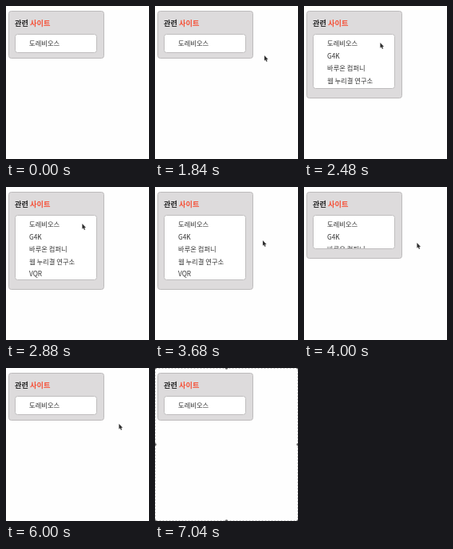
These frames come from a looping animation (179x192 px, 7.84 s). An HTML page with a canvas:

```html
<!DOCTYPE html>
<html lang="ko">
<head>
<meta charset="utf-8">
<title>관련 사이트</title>
<style>
html, body { margin: 0; width: 100%; height: 100%; overflow: hidden; background: #fff; }
canvas { display: block; width: 179px; height: 192px; }
</style>
</head>
<body>
<canvas id="stage"></canvas>
<script>
const W = 179, H = 192, LOOP = 7840, STEP = 80;
const FONT = '"Noto Sans CJK KR", "Noto Sans CJK", "Noto Sans", sans-serif';
const ITEMS = ['도레비오스', 'G4K', '바루온 컴퍼니', '웹 누리결 연구소', 'VQR'];
const CLOSED = 23, OPEN = 81, MAX = 96;
const OPEN_AT = 2120, CLOSE_AT = 3554, FADE = 1000;
const FRAME_AT = 6080;

// time, x, y of the pointer tip
const PATH = [
  [960, 169, 129], [1680, 138, 63], [1840, 136.5, 62], [2080, 122, 57],
  [2480, 95, 46], [3360, 95, 46], [3680, 134.5, 67], [4000, 141, 70]
];

const canvas = document.getElementById('stage');
const ctx = canvas.getContext('2d');
const ratio = window.devicePixelRatio || 1;
canvas.width = W * ratio;
canvas.height = H * ratio;

const clamp = v => Math.max(0, Math.min(1, v));

// cubic-bezier(.25, .1, .25, 1)
function ease(p) {
  p = clamp(p);
  let lo = 0, hi = 1;
  for (let i = 0; i < 24; i++) {
    const s = (lo + hi) / 2, r = 1 - s;
    if (0.75 * r * s * (r + s) + s * s * s < p) lo = s; else hi = s;
  }
  const r = 1 - lo;
  return 0.3 * r * r * lo + 3 * r * lo * lo + lo * lo * lo;
}

function listHeight(t) {
  const k = t < CLOSE_AT ? ease((t - OPEN_AT) / FADE) : 1 - ease((t - CLOSE_AT) / FADE);
  return Math.min(OPEN, CLOSED + (MAX - CLOSED) * k);
}

function pointerAt(t) {
  let i = 0;
  while (i < PATH.length - 2 && t >= PATH[i + 1][0]) i++;
  const [t0, x0, y0] = PATH[i], [t1, x1, y1] = PATH[i + 1];
  const p = clamp((t - t0) / (t1 - t0));
  return [x0 + (x1 - x0) * p, y0 + (y1 - y0) * p];
}

function box(x, y, w, h, fill, stroke) {
  ctx.beginPath();
  ctx.roundRect(x + 0.5, y + 0.5, w - 1, h - 1, 3);
  ctx.fillStyle = fill;
  ctx.fill();
  ctx.lineWidth = 1;
  ctx.strokeStyle = stroke;
  ctx.stroke();
}

function text(str, x, y, size, color, weight = 400) {
  ctx.font = `${weight} ${size}px ${FONT}`;
  ctx.fillStyle = color;
  ctx.fillText(str, x, y);
}

function drawPanel(t) {
  const h = Math.round(listHeight(t));
  const gap = 8 + 5 * clamp((h - CLOSED) / 15);
  box(3, 6, 120, Math.round(29 + h + gap), '#dddbdc', '#bdbbbc');
  text('관련', 11, 24.8, 9.2, '#2a2a2a', 700);
  text('사이트', 30, 24.8, 9.2, '#f5533a', 700);
  box(11, 35, 103, h + 1, '#fff', '#bfbdbe');
  ctx.save();
  ctx.beginPath();
  ctx.rect(12, 36, 101, h - 1);
  ctx.clip();
  ITEMS.forEach((s, i) => text(s, 29, 50.2 + 15.5 * i, 8.3, '#333'));
  ctx.restore();
}

function drawPointer(t) {
  const [x, y] = pointerAt(t);
  ctx.save();
  ctx.translate(x + 0.5, y + 0.3);
  ctx.beginPath();
  [[0, 0], [0, 6.2], [1.4, 5], [2.4, 7.4], [3.5, 7], [2.5, 4.7], [4.4, 4.6]]
    .forEach(p => ctx.lineTo(...p));
  ctx.closePath();
  ctx.lineJoin = 'round';
  ctx.lineWidth = 1;
  ctx.strokeStyle = '#d4d4d4';
  ctx.stroke();
  ctx.fillStyle = '#2c2c2c';
  ctx.fill();
  ctx.restore();
}

function drawSelection() {
  ctx.strokeStyle = '#c4c4c4';
  ctx.lineWidth = 1;
  ctx.setLineDash([2, 2]);
  ctx.strokeRect(0.5, 0.5, W - 1, H - 1);
  ctx.setLineDash([]);
  ctx.fillStyle = '#666';
  for (const x of [0, W / 2, W])
    for (const y of [0, H / 2, H])
      if (x !== W / 2 || y !== H / 2) {
        ctx.beginPath();
        ctx.arc(x, y, 1.8, 0, Math.PI * 2);
        ctx.fill();
      }
}

function draw(t) {
  ctx.setTransform(ratio, 0, 0, ratio, 0, 0);
  ctx.fillStyle = '#fefefe';
  ctx.fillRect(0, 0, W, H);
  drawPanel(t);
  if (t >= PATH[0][0] && t < FRAME_AT) drawPointer(t);
  if (t >= FRAME_AT) drawSelection();
}

const start = performance.now();
function tick() {
  const t = (performance.now() - start) % LOOP;
  draw(Math.floor(t / STEP) * STEP);
  requestAnimationFrame(tick);
}
tick();
</script>
</body>
</html>
```
